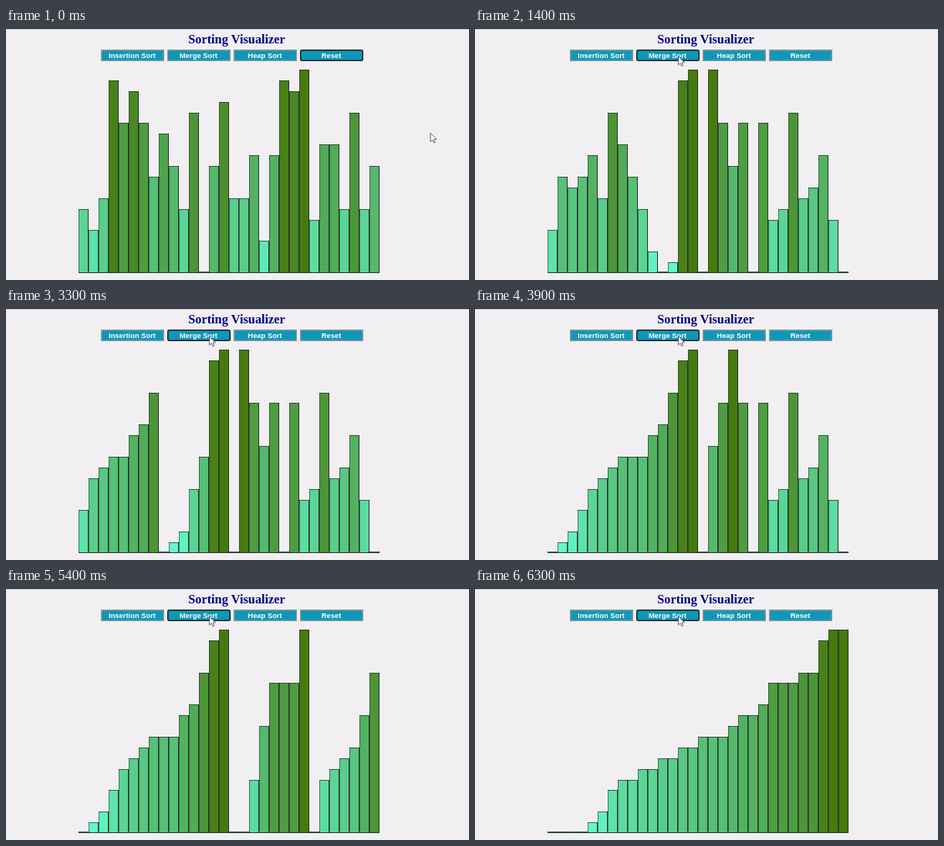
Write an HTML page with a canvas that moves like this. It is 600x327 px and loops after 6400 ms.

```html
<!DOCTYPE html>
<html lang="en">
<head>
<meta charset="utf-8">
<title>Sorting Visualizer</title>
<style>
  html, body { margin: 0; width: 100%; height: 100%; overflow: hidden; background: #f1eff2; }
  canvas { display: block; }
</style>
</head>
<body>
<canvas id="stage" width="600" height="327"></canvas>
<script>
const ctx = document.getElementById('stage').getContext('2d');
const LOOP = 6400, TICK = 100;
const RESET_AT = 600, SORT_AT = 1190, MERGE_MS = 154;
const LEFT = 94, PITCH = 13, FLOOR = 318, UNIT = 13.9, MAX = 19;

const firstValues = [6, 4, 7, 18, 14, 17, 14, 9, 13, 10, 6, 15, 0, 10, 16,
  7, 7, 11, 3, 11, 18, 17, 19, 5, 12, 12, 6, 15, 6, 10];
const secondValues = [4, 9, 8, 9, 11, 7, 15, 12, 9, 6, 2, 0, 1, 18, 19,
  0, 19, 14, 10, 14, 0, 14, 5, 6, 15, 7, 8, 11, 5, 0];

// One snapshot of the whole array after every merge
function mergeSteps(values) {
  const list = values.slice(), steps = [values];
  (function sort(lo, hi) {
    if (lo >= hi) return;
    const mid = (lo + hi) >> 1;
    sort(lo, mid);
    sort(mid + 1, hi);
    const run = list.slice(lo, hi + 1).sort((a, b) => a - b);
    list.splice(lo, run.length, ...run);
    steps.push(list.slice());
  })(0, list.length - 1);
  return steps;
}
const steps = mergeSteps(secondValues);

function valuesAt(t) {
  if (t < RESET_AT) return firstValues;
  const done = Math.floor((t - SORT_AT) / MERGE_MS);
  return steps[Math.max(0, Math.min(steps.length - 1, done))];
}

// Pointer stops: time, x, y
const pointerPath = [[0, 550, 136.5], [100, 550, 136.5], [500, 428, 38],
  [700, 428, 38], [1100, 263.5, 37], [LOOP, 263.5, 37]];

function pointerAt(t) {
  const i = pointerPath.findIndex(p => p[0] > t);
  const [t0, x0, y0] = pointerPath[i - 1], [t1, x1, y1] = pointerPath[i];
  const u = (t - t0) / (t1 - t0), k = u * u * (3 - 2 * u);
  return [x0 + (x1 - x0) * k, y0 + (y1 - y0) * k];
}

function rect(x, y, w, h, color) {
  ctx.fillStyle = color;
  ctx.fillRect(x, y, w, h);
}

function text(str, x, y, font, color) {
  ctx.font = font;
  ctx.fillStyle = color;
  ctx.textAlign = 'center';
  ctx.fillText(str, x, y);
}

function barColor(v) {
  const mix = (a, b) => Math.round(a + (b - a) * v / MAX);
  return `rgb(${mix(100, 70)},${mix(255, 122)},${mix(212, 14)})`;
}

function drawBar(v, i) {
  const x = LEFT + i * PITCH;
  const top = v ? Math.round(FLOOR - v * UNIT) : FLOOR - 2;
  const h = FLOOR - top;
  rect(x, top, PITCH, h, barColor(v));
  rect(x, top, 1, h, 'rgba(40,50,45,0.6)');
  rect(x, top, PITCH, 1, 'rgba(40,50,45,0.75)');
  rect(x + PITCH - 1, top, 1, h, '#26302b');
  rect(x, FLOOR - 1, PITCH, 1, '#26302b');
}

function drawButton(label, i, focused) {
  const x = 123 + i * 86, y = 28, w = 82, h = 15;
  if (focused) {
    ctx.beginPath();
    ctx.roundRect(x, y, w, h, 2.5);
    ctx.fillStyle = '#15181c';
    ctx.fill();
    rect(x + 1.5, y + 1.5, w - 3, h - 3, '#0e97b8');
  } else {
    rect(x, y, w, h, '#86959b');
    rect(x + 1.5, y + 1.5, w - 3, h - 3, '#0e97b8');
  }
  text(label, x + w / 2 - 0.5, 38.6, 'bold 9.4px "Liberation Sans", Arial, sans-serif', '#fff');
}

function drawPointer(x, y) {
  ctx.save();
  ctx.translate(x, y);
  ctx.beginPath();
  [[0, 0], [0, 11], [2.6, 8.7], [4.4, 12.6], [6.2, 11.8], [4.5, 8], [8, 7.8]]
    .forEach(p => ctx.lineTo(...p));
  ctx.closePath();
  ctx.fillStyle = '#fff';
  ctx.fill();
  ctx.strokeStyle = '#50525a';
  ctx.lineWidth = 0.9;
  ctx.stroke();
  ctx.restore();
}

function draw(t) {
  rect(0, 0, 600, 327, '#f1eff2');
  rect(0, 0, 600, 1, '#24222a');
  rect(0, 1, 600, 1, 'rgba(36,34,42,0.3)');
  text('Sorting Visualizer', 299, 20, 'bold 16.3px "Liberation Serif", Times, serif', '#000080');
  const focus = t < SORT_AT ? 3 : 1;
  ['Insertion Sort', 'Merge Sort', 'Heap Sort', 'Reset']
    .forEach((label, i) => drawButton(label, i, i === focus));
  valuesAt(t).forEach(drawBar);
  drawPointer(...pointerAt(t));
}

function frame() {
  const t = performance.now() % LOOP;
  draw(Math.floor(t / TICK) * TICK);
  requestAnimationFrame(frame);
}
frame();
</script>
</body>
</html>
```
